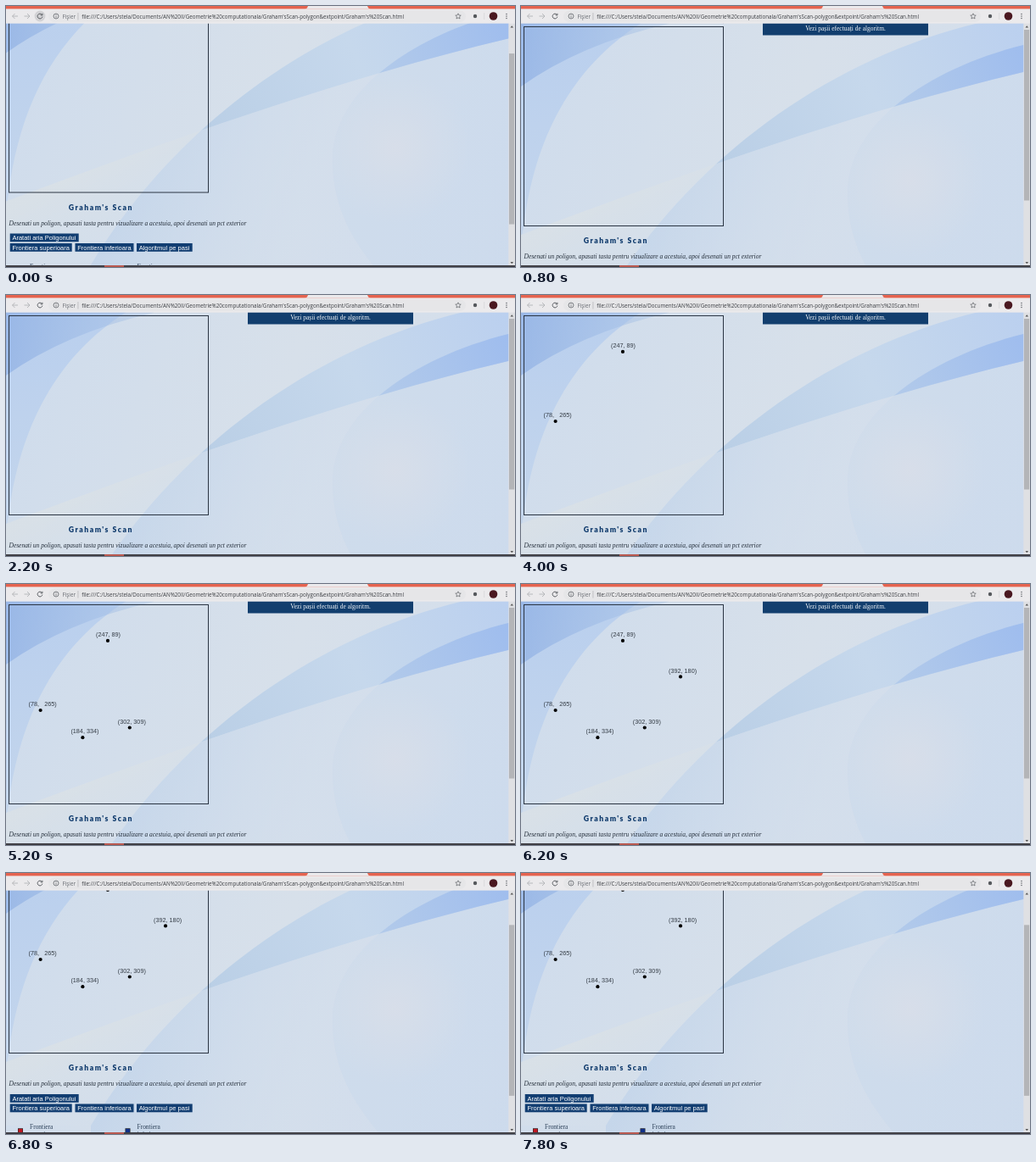
An HTML page with a canvas for the animation above (8000 ms loop, 600 px wide and 308 px high).

```html
<!DOCTYPE html>
<html lang="ro">
<head>
<meta charset="utf-8">
<title>Graham's Scan</title>
<style>
html, body { margin: 0; width: 100%; height: 100%; overflow: hidden; }
canvas { display: block; }
</style>
</head>
<body>
<canvas id="stage" width="600" height="308"></canvas>
<script>
const ctx = document.getElementById('stage').getContext('2d');
const LOOP = 8000, TICK = 200;
const VIEW = { top: 20.5, bottom: 306, right: 592.5 };
const NAVY = '#123e72';
const SANS = '"Liberation Sans", Arial, sans-serif';
const SERIF = '"Liberation Serif", "Times New Roman", serif';
const UI = '"Open Sans", sans-serif';

// [time, page offset]
const scrolls = [[0, 39.5], [600, 12], [800, 0], [6400, 40.5], [6600, 47]];
// [time, x, y, label] in drawing-area units
const points = [
  [3200, 247, 89, '(247, 89)'],
  [4000, 78, 265, '(78,   265)'],
  [4400, 184, 334, '(184, 334)'],
  [5000, 302, 309, '(302, 309)'],
  [5600, 392, 180, '(392, 180)']
];

const ARC = 'M100 345C200 178 380 43 590 10';
const LINE = 'M0 270C200 195 400 123 600 76';
const aboveArc = new Path2D(ARC + 'V0H0V345Z');
const belowArc = new Path2D(ARC + 'L600 10V400H100Z');
const aboveLine = new Path2D(LINE + 'V0H0Z');
const belowLine = new Path2D(LINE + 'V400H0Z');
const disc = new Path2D('M600 44C480 72 385 140 385 220C385 280 410 320 445 360H600Z');
const leftSweep = new Path2D('M3 262C16 155 60 72 142 20V0H0V275Z');
const corner = new Path2D('M0 95Q70 45 174 21V0H0Z');

function box(x, y, w, h, color) {
  ctx.fillStyle = color;
  ctx.fillRect(x, y, w, h);
}

function dot(x, y, r, color) {
  ctx.fillStyle = color;
  ctx.beginPath();
  ctx.arc(x, y, r, 0, Math.PI * 2);
  ctx.fill();
}

function stroke(d, color, width = 1) {
  ctx.strokeStyle = color;
  ctx.lineWidth = width;
  ctx.stroke(new Path2D(d));
}

function text(str, x, y, font, color, align = 'left') {
  ctx.font = font;
  ctx.fillStyle = color;
  ctx.textAlign = align;
  ctx.fillText(str, x, y);
}

function ramp(x0, y0, x1, y1, ...colors) {
  const g = ctx.createLinearGradient(x0, y0, x1, y1);
  colors.forEach((c, i) => g.addColorStop(i / (colors.length - 1), c));
  return g;
}

function fillInside(clips, shape, style) {
  ctx.save();
  clips.forEach(c => ctx.clip(c));
  ctx.fillStyle = style;
  ctx.fill(shape);
  ctx.restore();
}

function wallpaper() {
  box(0, 0, 600, 400, ramp(0, 100, 600, 300, '#cfdcec', '#d7e0ea', '#d2ddec'));
  fillInside([], leftSweep, ramp(0, 20, 40, 260, '#b9cfee', '#c3d5ec'));
  fillInside([], corner, ramp(0, 20, 174, 40, 'rgba(132,168,226,.6)', 'rgba(170,196,230,.4)'));
  fillInside([aboveArc], belowLine, ramp(60, 250, 110, 340, 'rgba(218,225,230,.8)', 'rgba(212,223,236,.3)'));
  fillInside([belowArc], aboveLine, ramp(237, 183, 590, 20, '#bacfe6', '#c6d8ec', '#bbd0ef'));
  fillInside([belowArc], belowLine, ramp(140, 250, 340, 320, 'rgba(190,210,234,.65)', 'rgba(206,220,238,.3)'));
  fillInside([], disc, 'rgba(190,209,236,.25)');
  fillInside([aboveLine], disc, ramp(440, 115, 592, 50, '#b2caea', '#9fbdee'));
  const glow = ctx.createRadialGradient(458, 207, 0, 458, 207, 90);
  glow.addColorStop(0, 'rgba(219,223,232,.7)');
  glow.addColorStop(1, 'rgba(219,223,232,0)');
  fillInside([belowLine], disc, glow);
}

function button(label, x, y, w) {
  box(x, y, w, 9.8, NAVY);
  text(label, x + 2.7, y + 7.6, '7.5px ' + SANS, '#fff');
}

function legend(x, color, word) {
  box(x, 348.3, 6, 7, '#222');
  box(x + .6, 348.9, 4.8, 6, color);
  const font = '7.46px ' + SERIF;
  text('Frontiera', x + 14, 349, font, '#2c4058');
  text(word, x + 14, 357.6, font, '#2c4058');
}

function drawingArea(t) {
  ctx.strokeStyle = '#2a3442';
  ctx.lineWidth = 1;
  ctx.strokeRect(3.5, 24.5, 235, 235);
  for (const [start, px, py, label] of points) {
    if (t < start) continue;
    const x = 4 + px * .4695, y = 25.5 + py * .466;
    dot(x, y, 2.1, '#000');
    text(label, x - 14, y - 4.7, '7.25px ' + SANS, '#333b44');
  }
}

function page(t, offset) {
  ctx.save();
  ctx.beginPath();
  ctx.rect(0, VIEW.top, VIEW.right, VIEW.bottom - VIEW.top);
  ctx.clip();
  ctx.translate(0, -offset);
  wallpaper();
  box(285, 15, 195, 19.5, '#123e6e');
  text('Vezi pașii efectuați de algoritm.', 382.5, 29.3, '7.46px ' + SERIF, '#f2f5f8', 'center');
  drawingArea(t);
  ctx.letterSpacing = '1.5px';
  text("Graham's Scan", 73.7, 280, '900 8.7px Lato, sans-serif', '#0f3a6c');
  ctx.letterSpacing = '0px';
  text('Desenati un poligon, apasati tasta pentru vizualizare a acestuia, apoi desenati un pct exterior',
    3.5, 298, 'italic 7.46px ' + SERIF, '#26303c');
  button('Aratati aria Poligonului', 4.7, 308, 81);
  button('Frontiera superioara', 4.7, 319.5, 73);
  button('Frontiera inferioara', 81.5, 319.5, 69);
  button('Algoritmul pe pasi', 154, 319.5, 65.7);
  legend(14, '#c01822', 'superioara');
  legend(140.5, '#10308a', 'inferioara');
  ctx.restore();
}

function scrollbar(offset) {
  box(VIEW.right, VIEW.top, 7.5, VIEW.bottom - VIEW.top, '#dfe0e3');
  box(593, 28 + offset * .71, 6.2, 201.5, '#b4b5b8');
  ctx.fillStyle = '#555';
  ctx.fill(new Path2D('M594.5 25.5l1.8-2.2 1.8 2.2zM594.5 302l1.8 2.2 1.8-2.2z'));
}

function toolbar(hover) {
  box(0, 0, 600, VIEW.top, '#ebeaec');
  box(0, 0, 600, 3.4, '#e5634f');
  ctx.fillStyle = '#ebeaec';
  ctx.fill(new Path2D('M352 3.5Q355 3.5 356 0H426Q427 3.5 430 3.5Z'));
  ctx.fillStyle = '#e6e6e8';
  ctx.beginPath();
  ctx.roundRect(50, 5.5, 492, 13.5, 6.7);
  ctx.fill();

  if (hover) dot(40, 12, 6.4, '#d2d2d5');
  stroke('M14 12H7.5M10.5 9L7.5 12l3 3M21.5 12H28M25 9l3 3-3 3', '#b2b3b6', .9);
  stroke('M42.3 10.2A2.9 2.9 0 1 0 42.9 12.6M42.9 8.8V10.9H40.7', '#5b5e63', 1);
  stroke('M56 12a3 3 0 1 0 6 0a3 3 0 1 0-6 0M59 11.6V13.8M59 10V10.8', '#63666b', .8);
  text('Fișier', 66.5, 14.6, '6.3px ' + UI, '#666a70');
  box(84.6, 8, .7, 8.5, '#aeafb2');
  text("file:///C:/Users/stela/Documents/AN%20II/Geometrie%20computationala/Graham'sScan-polygon&extpoint/Graham's%20Scan.html",
    89.3, 14.6, '6.24px ' + UI, '#3c3f44');
  stroke('M533 8.8l.95 2.1 2.3.25-1.7 1.55.5 2.3-2.05-1.2-2.05 1.2.5-2.3-1.7-1.55 2.3-.25z', '#5d6065', .7);
  dot(553, 12, 2.2, '#55585c');
  box(563.5, 8, .6, 8, '#cfcfd2');
  dot(574.5, 12, 4.8, '#4a1820');
  for (const y of [9.4, 12, 14.6]) dot(590, y, .75, '#5b5e63');
}

function render(now) {
  const t = Math.floor(now % LOOP / TICK) * TICK;
  const offset = scrolls.filter(([start]) => start <= t).pop()[1];
  page(t, offset);
  scrollbar(offset);
  toolbar(t < 200);
  box(0, VIEW.bottom, 600, 2, '#403f45');
  box(116, VIEW.bottom, 23, 2, '#b8584f');
}

const begin = performance.now();
function loop() {
  render(performance.now() - begin);
  requestAnimationFrame(loop);
}
loop();
</script>
</body>
</html>
```
